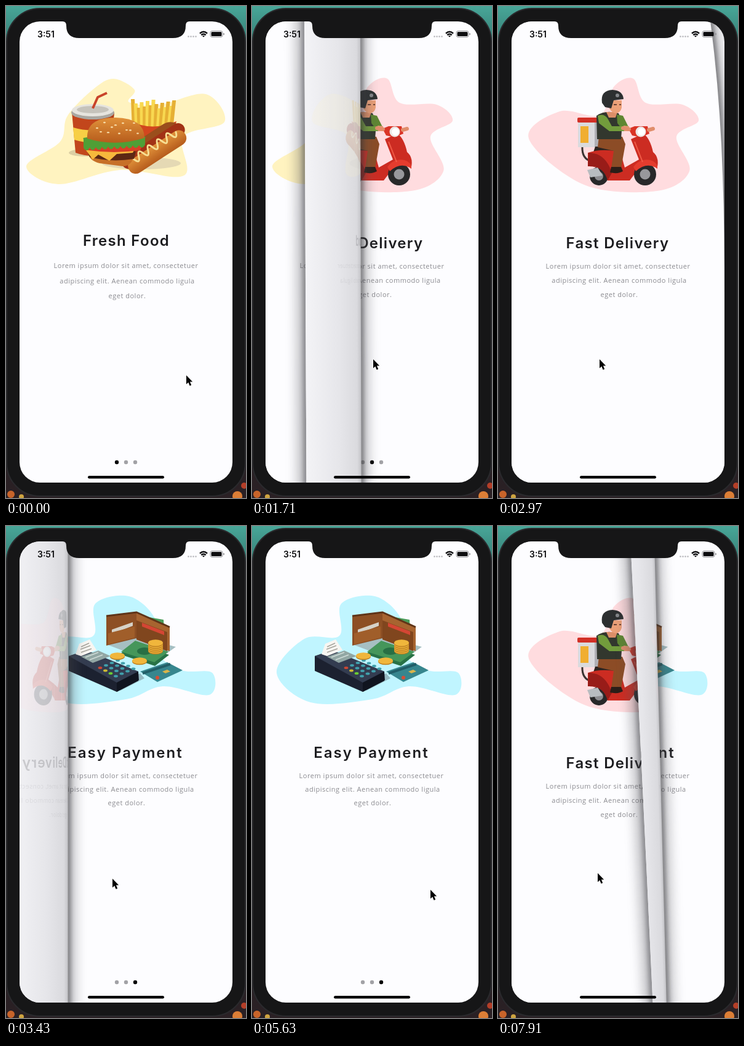
These frames come from a looping animation (390x798 px, 8000 ms). An HTML page:

```html
<!DOCTYPE html>
<html lang="en">
<head>
<meta charset="utf-8">
<title>Onboarding page curl</title>
<style>
html, body { margin: 0; width: 100%; height: 100%; overflow: hidden; background: #161617; }
svg { display: block; width: 100vw; height: 100vh; }
.title { font: 600 24px Inter, sans-serif; fill: #1d1d20; text-anchor: middle; letter-spacing: 1.3px; }
.body { font: 11px "Open Sans", sans-serif; fill: #8b8b90; text-anchor: middle; letter-spacing: .52px; }
.time { font: 600 14px Inter, sans-serif; fill: #0c0c0e; }
</style>
</head>
<body>
<svg viewBox="0 0 390 798" preserveAspectRatio="none">
<defs>
  <linearGradient id="sky" x2="0" y2="1"><stop offset="0" stop-color="#48a698"/><stop offset=".12" stop-color="#2b6560"/><stop offset=".3" stop-color="#202426"/><stop offset="1" stop-color="#2a2024"/></linearGradient>
  <linearGradient id="roll" gradientUnits="userSpaceOnUse">
    <stop offset="0" stop-color="#f3f3f6"/><stop offset=".6" stop-color="#e6e6ea"/>
    <stop offset=".93" stop-color="#dadade"/><stop offset="1" stop-color="#c4c4c8"/>
  </linearGradient>
  <linearGradient id="bun" x2="0" y2="1"><stop offset="0" stop-color="#e0913a"/><stop offset="1" stop-color="#b65c1c"/></linearGradient>
  <filter id="soft" filterUnits="userSpaceOnUse" x="-60" y="-20" width="510" height="840"><feGaussianBlur stdDeviation="3.5"/></filter>
  <filter id="wide" filterUnits="userSpaceOnUse" x="-60" y="-20" width="510" height="840"><feGaussianBlur stdDeviation="9"/></filter>
  <clipPath id="screen"><rect x="22" y="25" width="346" height="748" rx="33"/></clipPath>
  <clipPath id="flat"><path id="flatPath"/></clipPath>
  <clipPath id="flapClip"><path id="flapClipPath"/></clipPath>

  <g id="page0">
    <path id="blob0" fill="#fff3c0"/>
    <ellipse cx="128" cy="238" rx="26" ry="6" fill="#dccfa4"/>
    <ellipse cx="220" cy="255" rx="64" ry="10" fill="#e5d9b4"/>
    <path d="M107 172 113 238Q140 248 170 238L176 172Z" fill="#c2461c"/>
    <path d="M109 197Q140 206 174 197L172 217Q141 226 111 217Z" fill="#f7cf45"/>
    <path d="M157 174 176 172 170 238 155 242Z" fill="#8c2c10" opacity=".35"/>
    <ellipse cx="141" cy="173" rx="35" ry="11" fill="#aaa8a2"/>
    <ellipse cx="141" cy="169" rx="34" ry="10" fill="#e6e4de"/>
    <ellipse cx="141" cy="168" rx="26" ry="6" fill="#c6c3bb"/>
    <path d="M141 166 149 148 164 141" fill="none" stroke="#c9442a" stroke-width="4" stroke-linejoin="round"/>
    <g id="fries"></g>
    <path d="M203 187Q238 204 277 187L266 226 214 226Z" fill="#d2461e"/>
    <g transform="rotate(-33 240 228)">
      <rect x="184" y="206" width="110" height="43" rx="21" fill="#9a4e1c"/>
      <rect x="181" y="216" width="118" height="22" rx="11" fill="#a23216"/>
      <rect x="186" y="226" width="108" height="25" rx="12" fill="url(#bun)"/>
      <path id="mustard" fill="none" stroke="#f7df94" stroke-width="3" stroke-linecap="round"/>
    </g>
    <path d="M134 240H207Q207 259 190 260L152 255Q136 251 134 240Z" fill="#c77028"/>
    <path d="M132 236Q170 229 211 236L208 248Q170 254 136 245Z" fill="#5c2814"/>
    <path d="M130 234 210 230 206 238 180 240 168 251 150 241 141 249Z" fill="#f6b83c"/>
    <path d="M132 226Q175 218 222 226L218 234Q175 240 134 234Z" fill="#d84026"/>
    <path d="M126 217Q175 207 226 215" fill="none" stroke="#4f9f36" stroke-width="6"/>
    <path id="lettuce" fill="#4f9f36"/>
    <path d="M132 215Q130 181 178 181 225 182 225 214 178 229 132 215Z" fill="url(#bun)"/>
    <g id="seeds"></g>
    <text class="title" x="195.500" y="389">Fresh Food</text>
    <g class="body" id="copy0"></g>
  </g>

  <g id="page1">
    <path id="blob1" fill="#ffdcdf"/>
    <path d="M137 228Q136 248 152 252" fill="none" stroke="#3a3432" stroke-width="3"/>
    <circle cx="164" cy="276" r="15" fill="#282829"/><circle cx="164" cy="276" r="7" fill="#8c8c90"/>
    <path d="M130 187H165V229H130Z" fill="#dadadd"/><path d="M157 187h8v42h-8Z" fill="#b0b0b5"/>
    <rect x="129" y="181" width="37" height="8" rx="2" fill="#d23026"/>
    <rect x="134" y="195" width="13" height="27" fill="#f0ae30"/>
    <path d="M158 228H198L201 237H155Z" fill="#2d2420"/>
    <path d="M146 238Q170 230 199 237L206 262 229 249 216 216 236 207Q247 214 252 237 262 245 259 261 246 248 230 262L214 283H178Q174 259 146 260Z" fill="#cc2c22"/>
    <path d="M147 238Q175 238 185 271L178 283Q172 259 146 260Z" fill="#981c18"/>
    <circle cx="239" cy="273" r="18" fill="#282829"/><circle cx="239" cy="273" r="8.500" fill="#98989c"/>
    <path d="M220 261Q231 246 248 250 260 254 259 264 242 252 224 268Z" fill="#e43c2e"/>
    <path d="M145 266 162 262 170 275 150 278Z" fill="#b8bcc0"/>
    <path d="M164 212H202L207 224 200 263H184L188 235 162 229Z" fill="#8c4c26"/>
    <path d="M184 261H200L203 268Q195 273 182 270Z" fill="#2b1e18"/>
    <path d="M160 178Q174 168 196 174L202 189 200 216H161Z" fill="#32372e"/>
    <path d="M193 176 203 178 213 198 204 203 194 190Z" fill="#5e8632"/>
    <path d="M162 178Q173 173 179 184L185 195 207 195V203H181L164 190Z" fill="#729c3c"/>
    <path d="M176 172h18l-3 9h-11Z" fill="#dc8e68"/>
    <path d="M181 153H201V165Q199 174 190 174 180 170 180 160Z" fill="#eca078"/>
    <path d="M188 160h5m4 0h3" stroke="#4a2a20" stroke-width="1.500"/>
    <path d="M169 157Q166 137 186 136 203 137 204 151L188 153 184 166 174 164Z" fill="#2c2f30"/>
    <circle cx="194" cy="145" r="3" fill="#84868a"/>
    <path d="M204 194 213 195 214 203 205 203Z" fill="#e59a72"/>
    <path d="M212 199 222 195H243L246 207 232 213 218 210Z" fill="#da3426"/>
    <path d="M213 200 203 198m42 3 7-2" stroke="#e18e6c" stroke-width="6" stroke-linecap="round"/>
    <circle cx="232" cy="204" r="8.500" fill="#ece8e6"/><circle cx="233" cy="204" r="6" fill="#fff"/>
    <path d="M222 220 235 253" stroke="#f05a46" stroke-width="2"/>
    <text class="title" x="194.500" y="392.500">Fast Delivery</text>
    <g class="body" id="copy1"></g>
  </g>

  <g id="page2">
    <path id="blob2" fill="#c0f5ff"/>
    <path d="M166 193 215 180 276 196 262 206 200 206Z" fill="#a6bfc2"/>
    <path d="M163 146 212 140V182L163 194Z" fill="#8d4f24"/>
    <path d="M215 145 256 152 257 170 220 162Z" fill="#4a9c5a"/>
    <path d="M212 140 266 164V203L212 184Z" fill="#a76430"/>
    <path d="M212 153 262 172V203L212 184Z" fill="#80461e"/>
    <path d="M163 146 212 140 266 164" fill="none" stroke="#5f3418" stroke-width="3"/>
    <path d="M172 168 206 156V162L172 175Z" fill="#d6d2c8"/>
    <path d="M221 157 257 171V177L221 163Z" fill="#d44634"/>
    <path d="M166 174 209 163V181L166 192Z" fill="#a05e2a"/>
    <path d="M185 208 208 190 265 209 242 227Z" fill="#287246"/>
    <path d="M187 204 210 186 264 204 241 221Z" fill="#45965a"/>
    <ellipse cx="225" cy="203" rx="12" ry="6" fill="#286f44"/>
    <path d="M186 267 225 247 218 239 180 258Z" fill="#96bac2"/>
    <path d="M102 211 128 202 215 236 216 250 180 269 102 235Z" fill="#1c2130"/>
    <path d="M102 211 132 202 215 236 180 254Z" fill="#333c50"/>
    <path d="M180 254 215 236V251L180 269Z" fill="#10141f"/>
    <path d="M113 208 119 191 136 184 147 201 122 211Z" fill="#f8f6f2"/>
    <path d="M122 196 135 190m-14 10 16-6m-15 11 17-6" stroke="#a6a49c" stroke-width="1.500"/>
    <path d="M122 212 150 202 170 211 141 222Z" fill="#92a7a4"/>
    <path d="M129 213 150 205m-14 12 21-8" stroke="#d0dcd8" stroke-width="1.500"/>
    <g id="keys"></g>
    <path d="M218 236 262 221 287 234 246 253Z" fill="#37868e"/>
    <path d="M222 239 267 224" stroke="#215e68" stroke-width="4"/>
    <path d="M254 236 262 233 267 236 259 239Z" fill="#d9b44a"/>
    <circle cx="246" cy="246" r="3" fill="#d64d36"/>
    <g id="coins"></g>
    <text class="title" x="194" y="376" style="letter-spacing:2px">Easy Payment</text>
    <g class="body" id="copy2"></g>
  </g>
</defs>

<rect width="390" height="798" fill="url(#sky)"/>
<g id="wallpaper">
  <path d="M0 640Q5 660 0 685Z" fill="#8e2a22"/>
  <circle cx="8" cy="792" r="6" fill="#c8642a"/><circle cx="25" cy="796" r="4" fill="#cfa440"/>
  <circle cx="376" cy="795" r="8" fill="#dc7e36"/><circle cx="387" cy="778" r="5" fill="#b43e28"/>
</g>
<rect x="1" y="4" width="388" height="791" rx="54" fill="#161617" stroke="#2a2a2d" stroke-width="2"/>

<g clip-path="url(#screen)">
  <rect width="390" height="798" fill="#fdfdff"/>
  <use id="under"/>
  <g id="dots"></g>
  <g id="curl">
    <path class="fold" fill="none" stroke="#55555a" stroke-width="26" opacity=".34" filter="url(#wide)"/>
    <path class="fold" fill="none" stroke="#2a2a2e" stroke-width="9" opacity=".5" filter="url(#soft)"/>
    <g clip-path="url(#flat)">
      <rect width="390" height="798" fill="#fdfdff"/>
      <use id="over"/>
      <g id="lift">
        <path class="edge" fill="none" stroke="#55555a" stroke-width="30" opacity=".36" filter="url(#wide)"/>
        <path class="edge" fill="none" stroke="#2a2a2e" stroke-width="9" opacity=".4" filter="url(#soft)"/>
      </g>
    </g>
    <path id="flap" fill="url(#roll)"/>
    <g clip-path="url(#flapClip)"><g id="strips" opacity=".17"></g></g>
  </g>
</g>

<path d="M85 20V25H92Q98 25 98 32 98 52 119 52H271Q292 52 292 32 292 25 298 25H305V20Z" fill="#161617"/>
<text class="time" x="51" y="51">3:51</text>
<path d="M296.500 49.500h0m4 0h0m4 0h0m4 0h0" stroke="#b6b6ba" stroke-width="2.600" stroke-linecap="round"/>
<g fill="none" stroke="#0c0c0e" stroke-width="2.400"><path d="M315 44.500Q321 39 327 44.500M317.300 47.200Q321 43.800 324.700 47.200"/><path d="M319.500 48.600h3l-1.500 1.600Z" stroke-width="1"/></g>
<rect x="332" y="40.500" width="20" height="10" rx="3" fill="none" stroke="#929296"/>
<rect x="333.500" y="42" width="17" height="7" rx="1.500" fill="#0c0c0e"/>
<path d="M354 44v3" stroke="#929296" stroke-width="1.500"/>
<rect x="133" y="762" width="124" height="4.500" rx="2.250" fill="#060607"/>
<path id="cursor" d="M0 0V14.500L3.300 11.500 5.600 17 8.200 15.900 5.900 10.600H10.200Z" fill="#000" stroke="#fff" stroke-width="1.200" paint-order="stroke"/>
</svg>

<script>
const LOOP = 8000, TURN = 1070, RIGHT = 368, TOP = 26, BOTTOM = 773, STRIPS = 10;
const $ = id => document.getElementById(id);
const all = sel => document.querySelectorAll(sel);
const clamp = (v, a, b) => Math.min(b, Math.max(a, v));
const mix = (a, b, u) => a + (b - a) * u;
const smooth = u => u * u * (3 - 2 * u);

function set(el, attrs) {
  for (const k in attrs) el.setAttribute(k, attrs[k]);
}
function add(parent, tag, attrs) {
  const el = document.createElementNS("http://www.w3.org/2000/svg", tag);
  set(el, attrs);
  parent.appendChild(el);
  return el;
}
// Calls fn(i) for 0..n-1 and collects the results.
const times = (n, fn) => Array.from({ length: n }, (_, i) => fn(i));

// Closed smooth curve through "x,y x,y ..." key points.
function blob(id, keys) {
  const pts = keys.split(" ").map(p => p.split(",").map(Number)), n = pts.length;
  const p = i => pts[(i + n) % n];
  const d = times(n, i => {
    const [a, b, c, e] = [p(i - 1), p(i), p(i + 1), p(i + 2)];
    return "C" + [0, 1].map(k => b[k] + (c[k] - a[k]) / 6) + "," +
      [0, 1].map(k => c[k] - (e[k] - b[k]) / 6) + "," + c;
  });
  $(id).setAttribute("d", "M" + pts[0] + d.join("") + "Z");
}
blob("blob0", "33,260 88,220 100,178 143,134 175,118 209,136 200,156 250,160 325,143 355,188 288,212 289,275 185,266 85,289");
blob("blob1", "50,215 100,171 165,177 189,130 220,118 240,157 300,160 326,186 290,212 311,268 258,300 140,290");
blob("blob2", "40,238 85,183 142,178 145,126 200,114 242,150 246,205 285,234 335,238 330,274 255,260 195,281 95,286");

// Food details
times(15, i => {
  const x = 203 + i * 4.8, y = 151 + i * 7 % 16;
  add($("fries"), "path", { d: `M${x} ${y}h6L${x + 8 - i / 2} 200h-6Z`, fill: i % 2 ? "#f8d850" : "#e6b034" });
});
times(12, i => add($("seeds"), "ellipse", { cx: 148 + i * 6, cy: 198 + 9 * Math.sin(i * 2.4), rx: 2, ry: 1.2, fill: "#f7dca8" }));
$("mustard").setAttribute("d", "M193 228" + "q4.500 -13 9 0t9 0".repeat(5));
$("lettuce").setAttribute("d", "M126 217Q175 207 226 215V225" + "q-5 9 -10 .5".repeat(10) + "Z");

// Terminal keys and coins
times(16, i => {
  const row = i >> 2, col = i % 4;
  add($("keys"), "ellipse", { cx: 153 + row * 8.5 + col * 9.5, cy: 230 + row * 4.5 - col * 4, rx: 3.4, ry: 2.1,
    fill: col || row > 2 ? "#40a0ac" : `hsl(${8 + row * 45} 60% 50%)` });
});
function coins(x, y, count) {
  times(count * 2, i => add($("coins"), "ellipse", { cx: x, cy: y - i * 1.5, rx: 12, ry: 5.3, fill: i % 2 ? "#f0b63c" : "#bc7e20" }));
}
coins(181, 212, 1);
coins(217, 220, 1);
coins(243, 203, 5);

function copy(id, x, y, gap) {
  ["Lorem ipsum dolor sit amet, consectetuer", "adipiscing elit. Aenean commodo ligula", "eget dolor."]
    .forEach((line, i) => add($(id), "text", { x: x + (i ? 2 : 0), y: y + i * gap }).textContent = line);
}
copy("copy0", 195, 425, 24.5);
copy("copy1", 195, 426, 23);
copy("copy2", 194, 409, 22);

const dots = times(3, i => add($("dots"), "circle", { cx: 180 + 15 * i, cy: 740, r: 3.2 }));
const strips = times(STRIPS, i => {
  const clip = add(document.querySelector("defs"), "clipPath", { id: "strip" + i });
  return {
    rect: add(clip, "rect", { y: 0, height: 798 }),
    use: add($("strips"), "use", { "clip-path": `url(#strip${i})` })
  };
});

const turns = [
  { at: 1126, over: 0, under: 1 },
  { at: 2730, over: 1, under: 2 },
  { at: 7280, over: 1, under: 2, back: true }
];
// Pointer strokes: straight moves between rests.
const strokes = [
  { at: 900, end: 1710, x: 197, y: 573 }, { at: 1900, end: 2600, x: 215, y: 573 },
  { at: 2600, end: 2970, x: 165, y: 573 }, { at: 2970, end: 3430, x: 173, y: 572 },
  { at: 3600, end: 4270, x: 164, y: 568 }, { at: 4300, end: 4900, x: 290, y: 590 },
  { at: 6200, end: 7030, x: 93, y: 563 }, { at: 7300, end: 7910, x: 162, y: 563 }
];

// Paper rolled round a cylinder of radius r that starts at x0.
function rolled(x, x0, r) {
  const a = (x - x0) / r;
  if (a <= 0) return x;
  return a < Math.PI ? x0 + r * Math.sin(a) : x0 - (x - x0 - Math.PI * r);
}
function profile(x0, r) {
  const a = (RIGHT - x0) / r;
  if (a <= 0) return { fold: RIGHT + 20, edge: RIGHT + 20 };
  const fold = x0 + r * Math.sin(Math.min(a, Math.PI / 2));
  return { fold, edge: a < Math.PI / 2 ? fold : rolled(RIGHT, x0, r) };
}

function drawCurl(x0) {
  const r = clamp(108 - .22 * x0, 20, 90);
  const tilt = 99 * Math.pow(Math.max(0, x0) / 305, 3.3);
  const rows = times(18, i => {
    const k = (i - 1) / 15;
    return { y: mix(TOP, BOTTOM, k), ...profile(x0 + tilt * k, r) };
  });
  const line = pts => "M" + pts.map(p => p.map(v => v.toFixed(1)).join(" ")).join("L");
  const fold = rows.map(p => [p.fold, p.y]), edge = rows.map(p => [p.edge, p.y]);
  all(".fold").forEach(el => el.setAttribute("d", line(fold)));
  all(".edge").forEach(el => el.setAttribute("d", line(edge)));
  const flap = line(fold.concat([...edge].reverse())) + "Z";
  $("flap").setAttribute("d", flap);
  $("flapClipPath").setAttribute("d", flap);
  $("flatPath").setAttribute("d", line(edge) + "L-200 830L-200 -30Z");

  const top = profile(x0, r), bottom = profile(x0 + tilt, r);
  const skew = (bottom.fold - top.fold) / (BOTTOM - TOP);
  $("lift").setAttribute("opacity", clamp((top.fold - top.edge) / 25, 0, 1));
  set($("roll"), { x1: top.fold - r, x2: top.fold, y1: 0, y2: 0,
    gradientTransform: `matrix(1 0 ${skew} 1 ${-skew * TOP} 0)` });

  // Mirrored content on the back, squeezed strip by strip.
  const start = x0 + r * Math.PI / 2, step = (RIGHT - start) / STRIPS;
  $("strips").style.display = step > 0 ? "" : "none";
  if (step <= 0) return;
  strips.forEach(({ rect, use }, i) => {
    const a = start + i * step, xa = rolled(a, x0, r), scale = (rolled(a + step, x0, r) - xa) / step;
    set(rect, { x: a, width: step });
    use.setAttribute("transform", `matrix(${scale} 0 ${skew} 1 ${xa - scale * a - skew * TOP} 0)`);
  });
}

function pointer(t) {
  let x = 293, y = 599;
  for (const s of strokes) {
    const u = clamp((t - s.at) / (s.end - s.at), 0, 1);
    x = mix(x, s.x, u);
    y = mix(y, s.y, u);
  }
  return `translate(${x} ${y})`;
}

function render(t) {
  const turn = turns.find(c => t >= c.at && t < c.at + TURN);
  const page = turn ? turn.under : turns.filter(c => !c.back && t >= c.at).length;
  $("under").setAttribute("href", "#page" + page);
  dots.forEach((dot, i) => dot.setAttribute("fill", i === page ? "#050506" : "#a2a2a6"));
  $("curl").style.display = turn ? "" : "none";
  if (turn) {
    const s = smooth((t - turn.at) / TURN);
    $("over").setAttribute("href", "#page" + turn.over);
    strips.forEach(p => p.use.setAttribute("href", "#page" + turn.over));
    drawCurl(RIGHT - 493 * (turn.back ? 1 - s : s));
  }
  $("cursor").setAttribute("transform", pointer(t));
}

const began = performance.now();
function frame() {
  render((performance.now() - began) % LOOP);
  requestAnimationFrame(frame);
}
frame();
</script>
</body>
</html>
```
